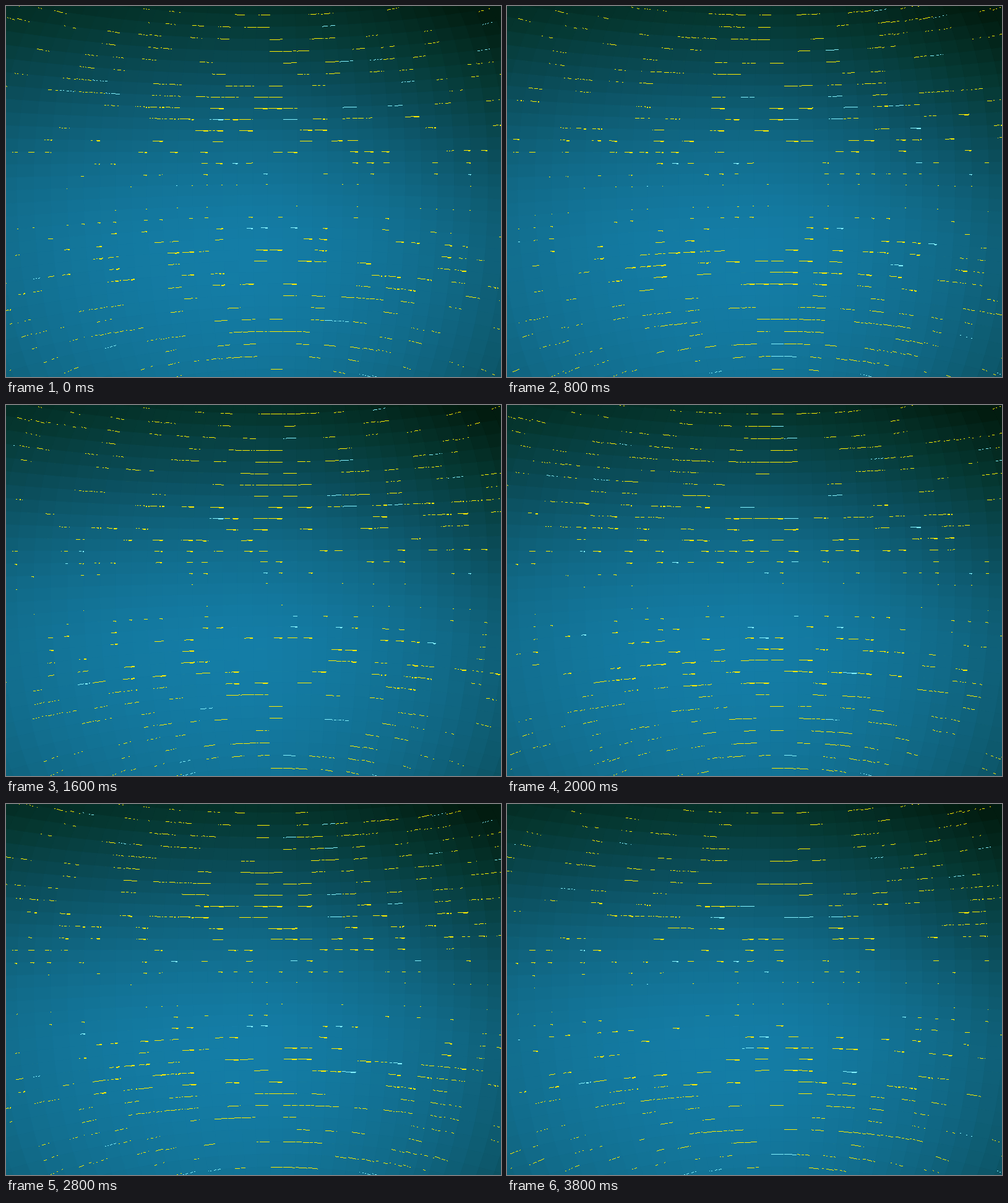
An HTML page with a canvas that plays this animation: 800x600 px, repeating every 4 s.

```html
<!DOCTYPE html>
<html lang="en">
<head>
<meta charset="utf-8">
<title>Glints inside a dome</title>
<style>
  html, body { margin: 0; width: 100%; height: 100%; overflow: hidden; background: #0f6480; }
  canvas { display: block; width: 800px; height: 600px; }
</style>
</head>
<body>
<canvas id="stage" width="800" height="600"></canvas>
<script>
const W = 800, H = 600, STEP = 200, STEPS = 20;
const COLS = [-22, 18], ROWS = [-20, 18];
const LIT = 0.36, PALE = 0.07;
const ctx = document.getElementById('stage').getContext('2d');

// Repeatable value in 0..1 for three integers
function hash(a, b, c) {
  let h = Math.imul(a + 101, 374761393) ^ Math.imul(b + 211, 668265263) ^ Math.imul(c + 307, 2147483647);
  h = Math.imul(h ^ (h >>> 15), 2246822519);
  h = Math.imul(h ^ (h >>> 13), 3266489917);
  return ((h ^ (h >>> 16)) >>> 0) / 4294967296;
}

// Grid of the dome seen from inside: meridians close in, parallels bend away
const narrow = r => 1 - 0.0012 * r - 0.0004 * r * r - 1.2e-6 * r ** 4;
const columnX = (c, r) => 447 + narrow(r) * (24.2 * c + 0.032 * c * c + 0.00546 * c ** 3);
const bend = r => (r + 3.4) * 1.93e-5 + 2e-6 * Math.max(0, r - 7) ** 2;

function rowY(x, r) {
  const u = x - 430;
  return 305.6 + 17.45 * r + 0.022 * r * r + 0.00437 * r ** 3 + bend(r) * u * u - 0.0048 * u;
}

function corner(c, r) {
  const x = columnX(c, r);
  return [x, rowY(x, r)];
}

const SHADES = [
  [0, 2, 28, 16], [0.3, 5, 56, 50], [0.55, 11, 78, 92], [0.8, 17, 106, 136], [1, 20, 125, 166]
];

function shade(level) {
  const v = Math.min(1, Math.max(0, level));
  const i = Math.max(1, SHADES.findIndex(s => v <= s[0]));
  const a = SHADES[i - 1], b = SHADES[i], k = (v - a[0]) / (b[0] - a[0]);
  const mix = n => Math.round(a[n] + (b[n] - a[n]) * k);
  return `rgb(${mix(1)},${mix(2)},${mix(3)})`;
}

function light(x, y) {
  const u = (x - 390) / 400, v = (y - 390) / 390;
  const fall = v < 0 ? 0.78 * (-v) ** 1.6 : 0.35 * v * v;
  const side = u < 0 ? 0.17 * (1 + 0.7 * Math.min(0, v)) * u * u : 0.29 * u ** 1.6;
  return 1 - fall - side;
}

function paintDome() {
  const layer = document.createElement('canvas');
  layer.width = W;
  layer.height = H;
  const g = layer.getContext('2d');
  for (let r = ROWS[0]; r < ROWS[1]; r++) {
    for (let c = COLS[0]; c < COLS[1]; c++) {
      const [x, y] = corner(c + 0.5, r + 0.5);
      g.fillStyle = g.strokeStyle = shade(light(x, y) + (hash(c, r, 900) - 0.5) * 0.006);
      g.beginPath();
      for (const [dc, dr] of [[0, 0], [1, 0], [1, 1], [0, 1]]) g.lineTo(...corner(c + dc, r + dr));
      g.closePath();
      g.fill();
      g.stroke();
    }
  }
  return layer;
}

// Thin sliver along a cell's edge, anchored at its right end, drawn with hard pixels.
// Towards the corners it gets thinner than a pixel and breaks up.
function makeGlint(c, r) {
  const right = columnX(c, r), cell = right - columnX(c - 1, r);
  const jitter = 0.88 + 0.24 * hash(c, r, 901);
  const reach = (4.2 * Math.abs(r) - 2) * (1 - 0.45 * (c / 17) ** 2) * jitter;
  const len = Math.max(1.5, Math.min(cell - 1, reach));
  const mid = right - len / 2, midY = rowY(mid, r);
  const slope = (2 * bend(r) * (mid - 430) - 0.0048) * (1 + 0.004 * r * r);
  const thick = Math.abs(r) < 9 && hash(c, r, 902) < 0.6;
  const color = hash(c, r, 903) < PALE ? '#84f2ff' : '#ffec00';
  const gaps = 0.6 * Math.min(1, Math.abs(c * r) / 160);
  const dots = [];
  for (let x = Math.round(right - len); x < Math.round(right); x++) {
    if (hash(x >> 1, r, 904) < gaps) continue;
    const tall = thick && x > right - len * 0.4 && x < right - 1;
    dots.push([x, Math.round(midY + slope * (x - mid)), tall ? 2 : 1]);
  }
  return { c, r, color, dots };
}

const dome = paintDome();
const glints = [];
for (let r = ROWS[0]; r <= ROWS[1]; r++) {
  if (r === 0) continue;
  for (let c = COLS[0]; c <= COLS[1]; c++) glints.push(makeGlint(c, r));
}

function draw(step) {
  ctx.drawImage(dome, 0, 0);
  for (const { c, r, color, dots } of glints) {
    if (hash(c, r, step) >= LIT) continue;
    ctx.fillStyle = color;
    for (const [x, y, h] of dots) ctx.fillRect(x, y, 1, h);
  }
}

let shown = -1;
function tick() {
  const step = Math.floor(performance.now() / STEP) % STEPS;
  if (step !== shown) draw(shown = step);
  requestAnimationFrame(tick);
}
tick();
</script>
</body>
</html>
```
